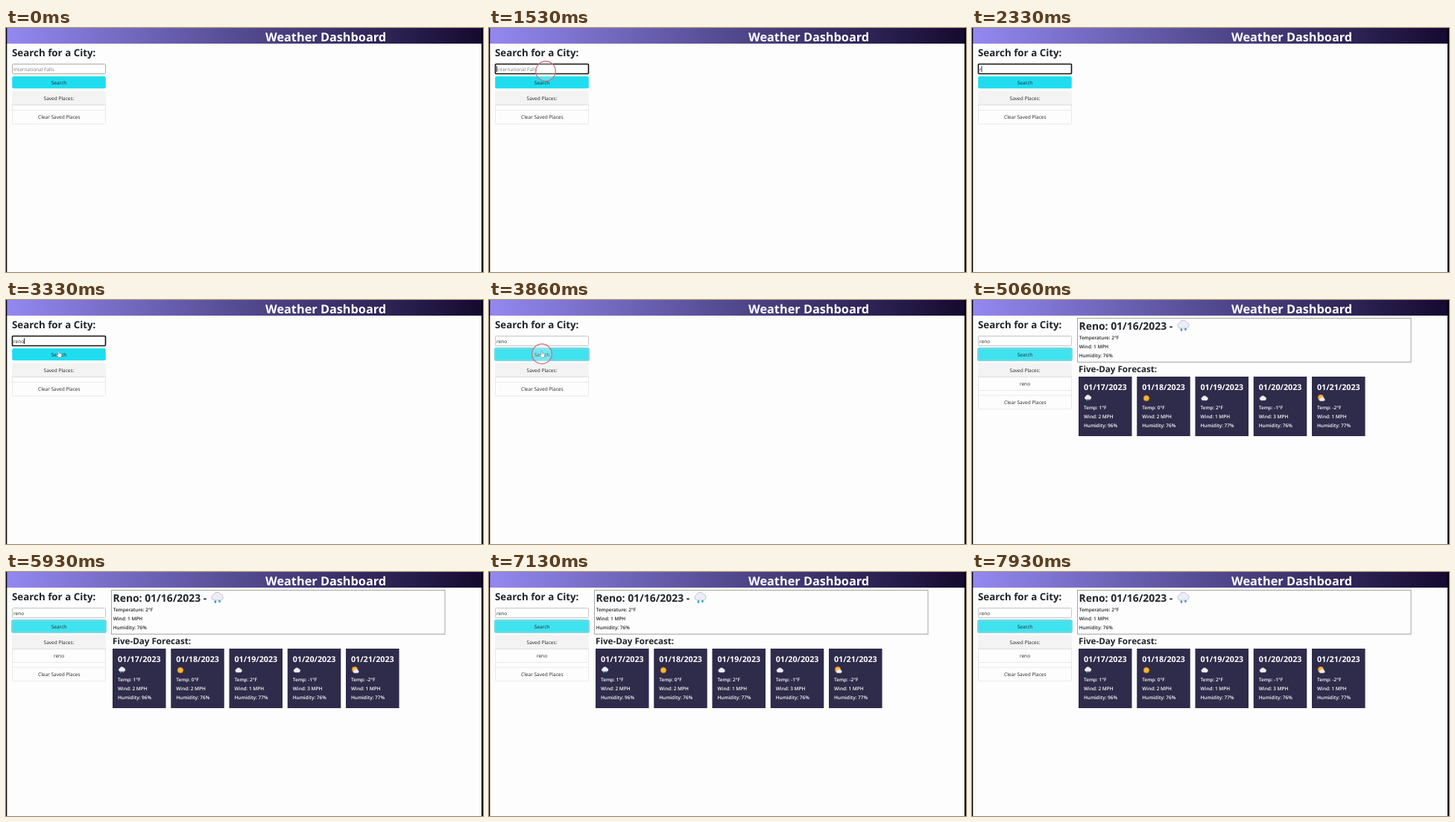
Recreate the animation shown at these times as an HTML page. Size 640x328 px, loop 8000 ms.

```html
<!DOCTYPE html>
<html lang="en">
<head>
<meta charset="utf-8">
<title>Weather Dashboard</title>
<style>
  html, body { margin: 0; width: 100%; height: 100%; overflow: hidden; background: #fdfdfd; }
  svg { display: block; width: 100vw; height: 100vh; }
  text { font: 6.55px "Open Sans", "Noto Sans", sans-serif; fill: #212529; text-rendering: geometricPrecision; }
  .semi { font-weight: 600; font-size: 6.45px; }
  .bold { font-weight: 700; }
  .mid { text-anchor: middle; }
  .line { fill: none; stroke: #e9e9e9; }
</style>
</head>
<body>
<svg viewBox="0 0 640 328">
  <defs>
    <linearGradient id="banner"><stop stop-color="#9389f1"/><stop offset="1" stop-color="#140a2e"/></linearGradient>
    <path id="cloud" d="M-3 3.2A2.5 2.5 0 0 1-3.4-1.6A3.5 3.5 0 0 1 2.8-2A2.7 2.7 0 0 1 3 3.2Z" fill="#efecf5" stroke="#bbb5c8" stroke-width=".5"/>
    <g id="sun">
      <circle r="4.1" fill="none" stroke="#e88b24" stroke-width="1.3" stroke-dasharray="1.5 .65"/>
      <circle r="3.6" fill="#f7b92f"/>
    </g>
    <g id="rain">
      <use href="#cloud" y="-1.3"/>
      <path d="M-1.8 3v.6M1.8 2.6v.4" stroke="#2ba7cd" stroke-width="1.7" stroke-linecap="round"/>
    </g>
    <g id="partly"><use href="#sun" x="-.8" y="-1"/><use href="#cloud" x="1.3" y="1.8" transform="scale(.85)"/></g>
  </defs>

  <rect width="640" height="328" fill="#fdfdfd"/>
  <rect width="640" height="21" fill="url(#banner)"/>
  <text class="bold" x="348" y="17.8" style="font-size:16.3px;fill:#fff">Weather Dashboard</text>
  <path d="M0 0H1.3V328H0ZM638 0h2V328h-2Z" fill="#000"/>

  <text class="bold" x="8" y="38.4" style="font-size:13.35px">Search for a City:</text>
  <rect id="field" x="8.5" y="48.5" width="125" height="13" rx="1" fill="#fff"/>
  <text id="entry" x="10" y="57.5"></text>
  <path id="caret" d="M0 51.2v7.8" stroke="#111" stroke-width=".9"/>
  <rect id="button" x="8.2" y="65" width="125.6" height="16.2" rx="2"/>
  <text class="mid" x="71" y="75.6">Search</text>

  <path class="line" d="M8.5 85V112M133.5 85V112"/>
  <rect x="8" y="84.5" width="126" height="19" fill="#f3f3f3"/>
  <path class="line" d="M8 103.5H134" style="stroke:#dedede"/>
  <text class="mid" x="71" y="96.8">Saved Places:</text>
  <g id="saved">
    <path class="line" d="M8.5 104V143M133.5 104V143"/>
    <text class="mid" x="71" y="114.8">reno</text>
    <path class="line" id="divider" d="M8 121.5H134"/>
  </g>
  <g id="clear">
    <rect class="line" id="clearBox" x="8.5" y="110.5" width="125" height="18.5" rx="1"/>
    <text class="mid" x="71.3" y="122.2">Clear Saved Places</text>
  </g>

  <g id="results">
    <rect x="141.5" y="24.5" width="447.5" height="59" fill="none" stroke="#a6a6a6"/>
    <text class="bold" x="143.5" y="40.2" style="font-size:13.9px">Reno: 01/16/2023 -</text>
    <use href="#rain" transform="translate(283.7 35) scale(1.55)"/>
    <text class="semi" x="143.7" y="53.3">Temperature: 2°F</text>
    <text class="semi" x="143.7" y="65.3">Wind: 1 MPH</text>
    <text class="semi" x="143.7" y="77.2">Humidity: 76%</text>
    <text class="bold" x="143" y="97.3" style="font-size:11.65px">Five-Day Forecast:</text>
    <g id="cards"></g>
  </g>

  <circle id="ring" r="13.3" fill="#fff" fill-opacity=".25" stroke="#d5697a" stroke-width="1.3"/>
  <path id="arrow" d="M0 0V9L2 7.2 3.4 10.2 4.8 9.6 3.5 6.7H6.3Z" fill="#fff" stroke="#333" stroke-width=".6"/>
  <path id="hand" d="M-1-3.8Q-.2-4.8.5-3.8V-.8L3-.2Q4 .2 3.8 1.4L3 4.7H-.8L-3 1.4Q-3.2.1-2 .6L-1 1.4Z" fill="#fff" stroke="#555" stroke-width=".4"/>
</svg>
<script>
const LOOP = 8000, APPEAR = 200, FOCUS = 1450, CLICK = 3800, LOADED = 4130, SETTLED = 4400, IDLE = 4900;
const KEYS = [2100, 2400, 2650, 2900];
// time, x, y
const POINTER = [[APPEAR, 88, 163], [880, 79, 104], [1400, 76, 58], [2980, 76, 58], [3250, 71, 72.5], [3900, 71, 72.5], [4200, 70.3, 75]];
const FORECAST = [
  ["rain", 1, 2, 96], ["sun", 0, 2, 76], ["cloud", 2, 1, 77], ["cloud", -1, 3, 76], ["partly", -2, 1, 77]
];

const el = id => document.getElementById(id);
const show = (id, on) => el(id).setAttribute("visibility", on ? "visible" : "hidden");
const set = (id, attrs) => { for (const k in attrs) el(id).setAttribute(k, attrs[k]); };

el("cards").innerHTML = FORECAST.map(([icon, temp, wind, humidity], i) => {
  const row = (y, text) => `<text class="semi" x="7" y="${y}" style="fill:#fff">${text}</text>`;
  return `<g transform="translate(${143 + i * 78.25} 103)">
    <rect width="71.5" height="80" fill="#2f2b4a"/>
    <text class="bold" x="7" y="17.9" style="font-size:10.7px;fill:#fff">01/${17 + i}/2023</text>
    <use href="#${icon}" transform="translate(12.7 29) scale(.9)"/>
    ${row(44.2, `Temp: ${temp}°F`)}${row(56.2, `Wind: ${wind} MPH`)}${row(68.2, `Humidity: ${humidity}%`)}
  </g>`;
}).join("");

function pointerAt(t) {
  const i = POINTER.findIndex(p => p[0] > t);
  if (i < 0) return POINTER.at(-1).slice(1);
  if (i === 0) return POINTER[0].slice(1);
  const [t0, x0, y0] = POINTER[i - 1], [t1, x1, y1] = POINTER[i];
  const u = (t - t0) / (t1 - t0), e = u * u * (3 - 2 * u);
  return [x0 + (x1 - x0) * e, y0 + (y1 - y0) * e];
}

function draw(t) {
  const focused = t >= FOCUS && t < CLICK, clicked = t >= CLICK, loaded = t >= LOADED;
  const typed = KEYS.filter(k => k <= t).length;

  el("entry").textContent = typed ? "reno".slice(0, typed) : "International Falls";
  el("entry").style.fill = typed ? "#212529" : "#7b7b7b";
  set("field", {
    stroke: focused ? "#111" : clicked ? "#c4c4c4" : "#aaa",
    "stroke-width": focused ? 1.6 : 1
  });
  const lastInput = typed ? KEYS[typed - 1] : FOCUS;
  show("caret", focused && (t - lastInput) % 1060 < 530);
  const caretX = typed ? 10.3 + el("entry").getComputedTextLength() : 10.4;
  set("caret", { transform: `translate(${caretX} 0)` });

  set("button", {
    fill: clicked ? "#3fe2ef" : "#1fdcef",
    stroke: clicked ? "#74d6e0" : "none", "stroke-width": 2.3
  });
  show("saved", loaded);
  show("results", loaded);
  show("divider", t >= SETTLED);
  show("clearBox", !loaded || t >= SETTLED);
  set("clear", { transform: `translate(0 ${loaded ? 17.6 : 0})` });

  const [x, y] = pointerAt(t);
  const overButton = y > 64 && y < 82;
  const place = `translate(${x} ${y})`;
  ["arrow", "hand", "ring"].forEach(id => set(id, { transform: place }));
  show("arrow", t >= APPEAR && t < FOCUS && !overButton);
  show("hand", t >= APPEAR && t < IDLE && overButton);
  const sincePress = t - (clicked ? CLICK : FOCUS);
  show("ring", sincePress >= 0 && sincePress < 270);
}

function tick() {
  draw(performance.now() % LOOP);
  requestAnimationFrame(tick);
}
tick();
</script>
</body>
</html>
```
